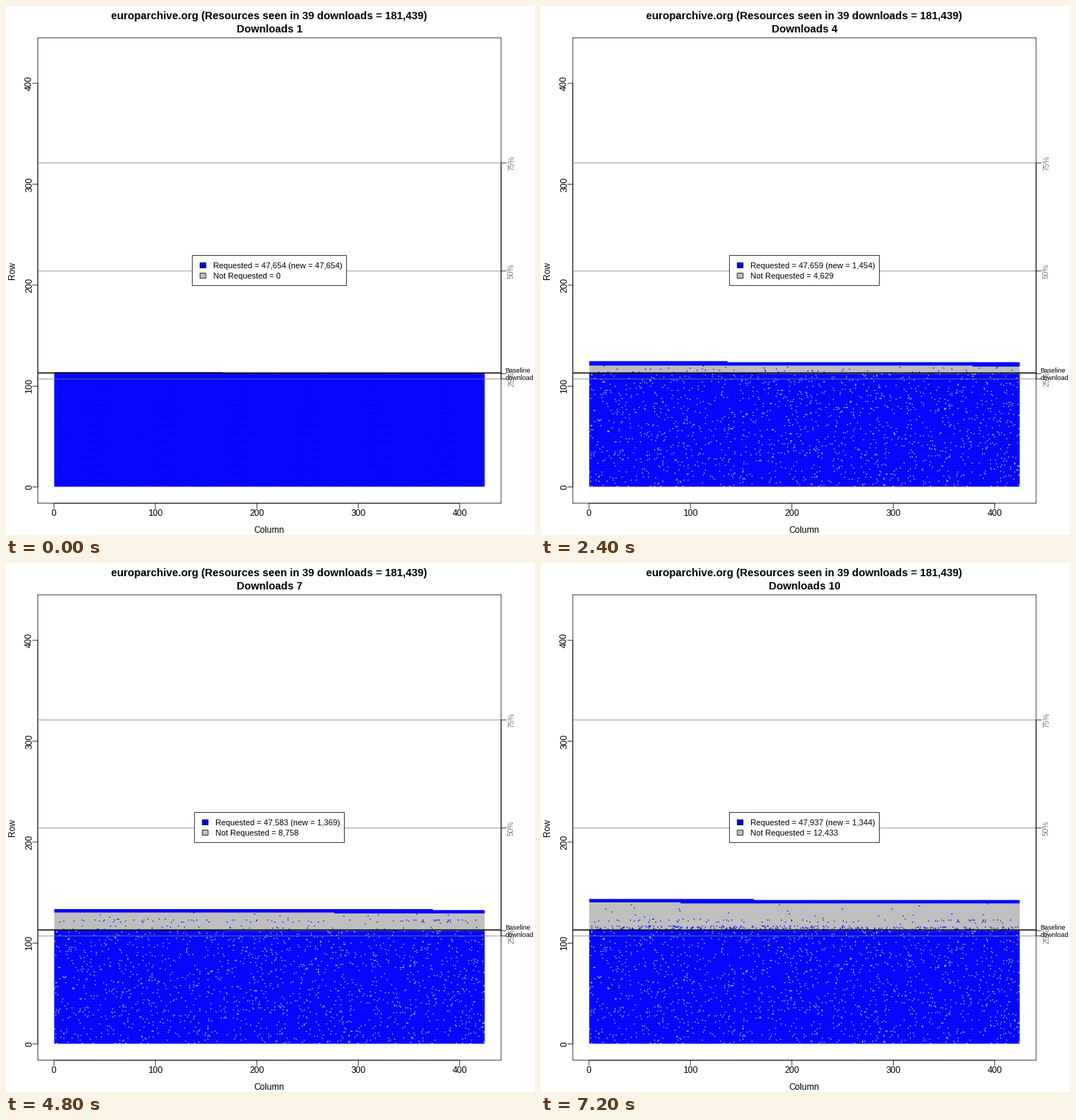
Recreate the animation shown at these times as a matplotlib script. Size 720 px wide and 720 px high, loop 8 s.

```python
import numpy as np
import matplotlib
import matplotlib.pyplot as plt
from matplotlib.animation import FuncAnimation
from matplotlib.patches import Rectangle

matplotlib.rcParams["font.family"] = "Liberation Sans"

SIZE = 720
COLS = 424
RESOURCES = 181439
BLUE, GRAY = (0, 0, 1, 1), (190 / 255, 190 / 255, 190 / 255, 1)
SLATE = "#708090"
LEFT, TOP, RIGHT, BOTTOM = 43.2, 43.2, 673.92, 676.8
MID_X, MID_Y = (LEFT + RIGHT) / 2, (TOP + BOTTOM) / 2

# Per download: resources seen for the first time, and known ones left out
NEW = np.array([47654, 1791, 1389, 1454, 1346, 1338, 1369, 1333, 1352, 1344])
SKIPPED = [0, 1452, 3190, 4629, 6030, 7077, 8758, 9788, 11117, 12433]
TOTAL = np.cumsum(NEW)
BASE = NEW[0]
BUSY = (6, 8, 9, 10)


def px(col):
    return LEFT + (col + 15.92) / 456.84 * (RIGHT - LEFT)


def py(row):
    return BOTTOM - (row + 16.08) / 461.16 * (BOTTOM - TOP)


rng = np.random.default_rng(39)
index = np.arange(TOTAL[-1])
cells = np.column_stack([px(index % COLS + 1), py(index // COLS + 1)])
cohort = np.searchsorted(TOTAL, index, side="right") + 1
chance = rng.random(len(index))
skip_rank = rng.permutation(BASE)


def requested(download):
    """Mask of the cells seen so far that this download asked for."""
    n = TOTAL[download - 1]
    mask = np.ones(n, bool)
    if download == 1:
        return mask
    mask[:BASE] = skip_rank >= (1452 if download == 2 else 1530)
    if download > 2:
        busy = download in BUSY
        rate = np.full(11, 0.003)
        rate[2] = 0.18 if busy else 0.025
        rate[3] = 0.01 if download < 6 else 0.003
        rate[4] = 0.06
        group = cohort[BASE:n]
        mask[BASE:] = (group == download) | (chance[BASE:n] < rate[group])
    return mask


fig = plt.figure(figsize=(SIZE / 72, SIZE / 72), dpi=72, facecolor="white")
ax = fig.add_axes([0, 0, 1, 1])
ax.set_xlim(0, SIZE)
ax.set_ylim(SIZE, 0)
ax.axis("off")


def line(x0, y0, x1, y1, color="black", width=0.75, z=3):
    ax.plot([x0, x1], [y0, y1], color=color, lw=width, snap=False, zorder=z,
            solid_capstyle="butt")


def box(x, y, w, h, fill="none", z=4):
    return ax.add_patch(Rectangle((x, y), w, h, fc=fill, ec="black", lw=0.75,
                                  snap=False, zorder=z))


def label(x, y, text, size=12, ha="center", angle=0, **style):
    return ax.text(x, y, text, size=size, ha=ha, va="baseline", zorder=6,
                   rotation=angle, rotation_mode="anchor", **style)


points = ax.scatter([], [], s=1.8 ** 2, marker="s", edgecolors="none",
                    linewidths=0, snap=False, zorder=1)

# Frame and axes
box(LEFT, TOP, RIGHT - LEFT, BOTTOM - TOP)
line(px(0), BOTTOM, px(400), BOTTOM)
line(LEFT, py(0), LEFT, py(400))
for tick in range(0, 401, 100):
    line(px(tick), BOTTOM, px(tick), BOTTOM + 7.2)
    label(px(tick), 694.2, str(tick))
    line(LEFT - 7.2, py(tick), LEFT, py(tick))
    label(35, py(tick), str(tick), angle=90)
label(MID_X, 717, "Column")
label(12, MID_Y, "Row", angle=90)

# Share of all resources, and the first download's level
for percent in (25, 50, 75):
    y = py(RESOURCES * percent / 100 / COLS)
    line(LEFT, y, RIGHT, y, SLATE)
    line(RIGHT, y, RIGHT + 7.2, y)
    label(691, y, f"{percent}%", 10.2, angle=90, color=SLATE)
line(RIGHT, py(RESOURCES * 0.25 / COLS), RIGHT, py(RESOURCES * 0.75 / COLS))
line(LEFT, py(113), RIGHT, py(113), width=1.5)
level = py(BASE / COLS)
line(RIGHT, level, RIGHT + 7.2, level)
label(679.7, 499, "Baseline", 9, "left")
label(679.7, 509, "download", 9, "left")

label(MID_X, 18, "europarchive.org (Resources seen in 39 downloads = 181,439)",
      14.5, weight="bold")
title = label(MID_X, 36, "", 14.5, weight="bold")

# Legend
panel = box(0, 339.5, 210, 41, "white", 4)
keys = [box(0, 349.5, 8, 7, BLUE, 5), box(0, 363.5, 8, 7, GRAY, 5)]
notes = [label(0, 357, "", 11, "left"), label(0, 371, "", 11, "left")]


def update(frame):
    download = frame + 1
    mask = requested(download)
    points.set_offsets(cells[:len(mask)])
    points.set_facecolor(np.where(mask[:, None], BLUE, GRAY))

    title.set_text(f"Downloads {download}")
    skipped = SKIPPED[frame]
    asked = TOTAL[frame] - skipped
    notes[0].set_text(f"Requested = {asked:,} (new = {NEW[frame]:,})")
    notes[1].set_text(f"Not Requested = {skipped:,}")

    width = 210 if download == 1 else 204
    x = MID_X - width / 2
    panel.set_x(x)
    panel.set_width(width)
    for key, note in zip(keys, notes):
        key.set_x(x + 10.5)
        note.set_x(x + 28.2)
    return [points, title, panel, *keys, *notes]


anim = FuncAnimation(fig, update, frames=len(NEW), interval=800, repeat=True,
                     repeat_delay=0, blit=False)
plt.show()
```
